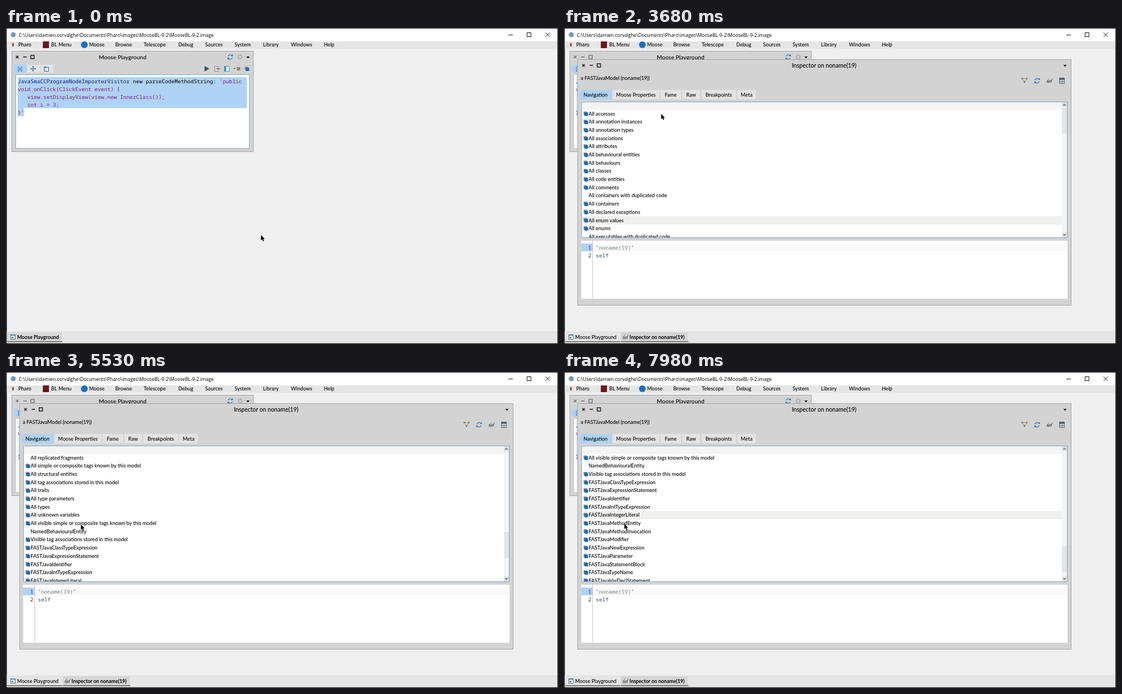
Recreate the animation shown at these times as an HTML page with a canvas. Size 990 by 566 pixels, loop 8 s.

```html
<!DOCTYPE html>
<html lang="en">
<head>
<meta charset="utf-8">
<title>Moose Playground</title>
<style>
html, body { margin: 0; width: 100%; height: 100%; overflow: hidden; background: #efefef; }
canvas { display: block; }
</style>
</head>
<body>
<canvas id="stage" width="990" height="566"></canvas>
<script>
const ctx = document.getElementById('stage').getContext('2d');
const UI = 'Lato, sans-serif', MONO = '"Noto Sans Mono", monospace', SANS = '"Open Sans", sans-serif';
const LOOP = 8000, ROW = 14.67, VISIBLE = 16;
const WINDOW = '#d2d3d2', ACCENT = '#afd2f7', BLUE = '#1769bd', SLATE = '#3c5360', BORDER = '#a5a6a5';

// A leading "-" marks an entry without an icon.
const ITEMS = [
  ...`accesses,annotation instances,annotation types,associations,attributes,behavioural entities,
  behaviours,classes,code entities,comments,-containers with duplicated code,containers,declared exceptions,
  enum values,enums,-executables with duplicated code,files,folders,functions,global variables,
  implicit variables,inheritances,invocations,local variables,methods,model annotation instances,
  model annotation types,model attributes,model classes,model containers,model enums,model functions,
  model methods,model namespaces,model packages,model structural entities,model types,models,namespaces,
  packages,parameter types,parameterizable classes,parameterized types,parameters,primitive types,references,
  -replicated fragments,simple or composite tags known by this model,structural entities,
  tag associations stored in this model,traits,type parameters,types,unknown variables,
  visible simple or composite tags known by this model`
    .split(',').map(s => s.trim()).map(s => s[0] === '-' ? '-All ' + s.slice(1) : 'All ' + s),
  '-NamedBehaviouralEntity', 'Visible tag associations stored in this model',
  ...`ClassTypeExpression,ExpressionStatement,Identifier,IntTypeExpression,IntegerLiteral,MethodEntity,
  MethodInvocation,Modifier,NewExpression,Parameter,StatementBlock,TypeName,VarDeclStatement,
  VariableDeclarator,VariableExpression,VariableName,WhileStatement`
    .split(',').map(s => 'FASTJava' + s.trim())
];

const MOUSE = [[0, 457, 371], [30, 457, 371], [450, 330, 252], [820, 238, 187], [1130, 194, 179], [1330, 194, 179],
  [1620, 174, 154], [3680, 174, 154], [4000, 166, 200], [4270, 160, 220], [4470, 158, 234], [4570, 158, 234],
  [4800, 153, 252], [5370, 140, 268], [6140, 112, 290], [6410, 112, 290], [6650, 116, 308], [6820, 116, 308],
  [7200, 138, 255], [7600, 146, 206], [7700, 142, 197], [7980, 108, 272], [8000, 108, 272]];
const SCROLL = [[0, 0], [3950, 0], [4270, 9], [4470, 17], [4570, 17], [4800, 34], [5370, 45], [5400, 45],
  [6080, 52], [6239, 52], [6240, 54], [8000, 54]];

function at(keys, t) {
  const i = Math.max(1, keys.findIndex(k => k[0] > t));
  const a = keys[i - 1], b = keys[i], p = (t - a[0]) / (b[0] - a[0]);
  return a.slice(1).map((v, n) => v + (b[n + 1] - v) * p);
}

function box(x, y, w, h, fill, stroke) {
  ctx.fillStyle = fill;
  ctx.fillRect(x, y, w, h);
  if (stroke) {
    ctx.strokeStyle = stroke;
    ctx.lineWidth = 1;
    ctx.strokeRect(x + .5, y + .5, w - 1, h - 1);
  }
}

function text(str, x, middle, { size = 9.15, color = '#000', font = UI, weight = 500, align = 'left' } = {}) {
  ctx.font = `${weight} ${size}px ${font}`;
  ctx.fillStyle = color;
  ctx.textAlign = align;
  ctx.fillText(str, x, middle + size * .36);
}

const code = (str, x, y, color) => text(str, x, y, { size: 9.57, font: MONO, weight: 400, color });

function line(points, color, width = 1) {
  ctx.beginPath();
  points.forEach(([x, y]) => ctx.lineTo(x, y));
  ctx.strokeStyle = color;
  ctx.lineWidth = width;
  ctx.stroke();
}

function polygon(points, color) {
  ctx.beginPath();
  points.forEach(([x, y]) => ctx.lineTo(x, y));
  ctx.fillStyle = color;
  ctx.fill();
}

function arc(x, y, r, color, { from = 0, to = 7, width = 0 } = {}) {
  ctx.beginPath();
  ctx.arc(x, y, r, from, to);
  ctx.fillStyle = ctx.strokeStyle = color;
  ctx.lineWidth = width;
  width ? ctx.stroke() : ctx.fill();
}

function cross(x, y, r, color, width) {
  line([[x - r, y - r], [x + r, y + r]], color, width);
  line([[x - r, y + r], [x + r, y - r]], color, width);
}

function windowButtons(x, y, color) {
  cross(x, y, 2.2, color, 1.5);
  box(x + 11, y - 1, 6, 1.5, color);
  ctx.strokeStyle = color;
  ctx.lineWidth = 1.4;
  ctx.strokeRect(x + 24.5, y - 3, 6, 6);
}

const dropdown = (x, y) => polygon([[x - 3, y - 1.5], [x + 3, y - 1.5], [x, y + 2]], '#111');

function refresh(x, y) {
  arc(x, y, 4, '#3c84c6', { from: .3, to: 2.7, width: 1.4 });
  arc(x, y, 4, '#3c84c6', { from: 3.4, to: 5.8, width: 1.4 });
  polygon([[x + 1, y - 2], [x + 5, y - 5.5], [x + 5, y - 1]], '#3c84c6');
  polygon([[x - 1, y + 2], [x - 5, y + 5.5], [x - 5, y + 1]], '#3c84c6');
}

function glasses(x, y) {
  arc(x - 3, y + 2, 1.7, '#56645f', { width: 1.2 });
  arc(x + 1.5, y + 1.5, 1.7, '#56645f', { width: 1.2 });
  line([[x - 4.5, y + 1], [x - 1, y - 3.5]], '#56645f');
  line([[x + 3, y + 1], [x + 5, y - 3.5]], '#56645f');
}

function grid(x, y, w, h, color) {
  box(x, y, w, h, '#f2f5f6', color);
  box(x, y, w, 3, color);
  for (let i = 1; i < 3; i++) {
    line([[x + w * i / 3, y], [x + w * i / 3, y + h]], color);
    line([[x, y + h * i / 3], [x + w, y + h * i / 3]], color);
  }
}

function desktop() {
  box(0, 0, 990, 566, '#16181d');
  box(1.5, 1, 987.5, 563.5, '#efefef');
  box(1.5, 1, 987.5, 23, '#fff');
  arc(13, 12, 4.5, '#7699b2');
  text('C:\\Users\\damien.corvalghe\\Documents\\Pharo\\images\\MooseBL-9-2\\MooseBL-9-2.image', 23, 12.5,
    { size: 8.49, font: SANS, weight: 400 });
  line([[901, 12.5], [909, 12.5]], '#111');
  box(934, 8, 8, 8, '#fff', '#111');
  cross(971.5, 12, 3.8, '#111', 1);

  box(1.5, 24, 987.5, 13, '#e5e5e5');
  box(11, 27, 3, 6, '#a84b3c');
  box(66, 24, 11, 12, '#701419');
  arc(140.5, 30, 6, '#176fc1');
  const menu = { Pharo: 22, 'BL Menu': 81, Moose: 149, Browse: 196, Telescope: 247, Debug: 309, Sources: 357,
    System: 410, Library: 461, Windows: 511, Help: 570 };
  for (const name in menu) text(name, menu[name], 30);
  box(1.5, 543, 987.5, 21.5, '#e5e5e5');
}

function taskbar(inspecting) {
  if (!inspecting) box(2, 545, 98, 16, '#d8d8d8');
  box(2, 561, 99, 1.5, '#5c5c5c');
  box(8, 549, 9, 9, '#eef4f8', '#4b7288');
  box(9, 549, 7, 2, '#3c84c6');
  box(10, 553, 3, 3, '#5b91b8');
  text('Moose Playground', 20, 553.5, { size: 9, weight: inspecting ? 500 : 700 });
  if (!inspecting) return;
  box(102, 545, 120, 16, '#d5d5d5');
  box(102, 561, 121, 1.5, '#5c5c5c');
  glasses(110.5, 553);
  text('Inspector on noname(19)', 117.6, 553.5, { size: 8.9, weight: 700 });
}

function playground({ active, selected, caret }) {
  box(10, 41, 434, 181, WINDOW, BORDER);
  windowButtons(20, 52, active ? '#111' : '#777');
  text('Moose Playground', 209, 52, { size: 10.4, align: 'center' });
  refresh(402, 52);
  arc(420, 52, 3.4, '#b2b4b2', { width: 2.4 });
  dropdown(434, 52.5);

  box(14, 66, 23, 14, ACCENT);
  box(38, 66, 23, 14, '#e3e4e3');
  box(62, 66, 23, 14, '#e3e4e3');
  text('[ı]', 25, 72.5, { size: 9, color: BLUE, weight: 700, align: 'center' });
  for (const [dx, dy] of [[1, 0], [-1, 0], [0, 1], [0, -1]]) {
    const x = 48.5 + dx * 5, y = 73 + dy * 5;
    line([[48.5, 73], [x - dx, y - dy]], BLUE);
    polygon([[x, y], [x - 2 * dx + 2 * dy, y - 2 * dy + 2 * dx], [x - 2 * dx - 2 * dy, y - 2 * dy - 2 * dx]], BLUE);
  }
  box(68, 70, 9, 8, '#eef4f8', BLUE);
  box(68, 69, 4, 2, BLUE);
  polygon([[356, 68], [364.5, 73], [356, 78]], SLATE);
  box(374, 68, 7, 10, '#e6e2e6', '#8c7f90');
  line([[377, 73], [384, 73]], '#8c5d86', 1.5);
  box(391, 68, 10, 10, '#e8f1f6', '#5b91b8');
  box(391, 68, 4, 10, '#5b91b8');
  box(408, 72, 4, 1, '#666');
  box(414, 70, 6, 6, '#858a8a');
  box(428, 69, 6, 6, '#999');
  box(430, 71, 6, 6, BLUE);

  box(17, 83, 420, 133, '#fff', active ? '#78acd8' : '#c3ccd2');
  if (selected) {
    const tint = active ? ACCENT : '#deecf9';
    box(21, 88, 411, 55.5, tint);
    box(21, 143, 11, 15, tint);
  }
  code('JavaSmaCCProgramNodeImporterVisitor', 21, 95.5, '#101a80');
  code('new parseCodeMethodString:', 227.7, 95.5, '#000');
  const string = '#7f1b8c';
  code("'public", 383, 95.5, string);
  ['void onClick(ClickEvent event) {', '   view.setDisplayView(view.new InnerClass());', '   int i = 3;', "}'"]
    .forEach((s, i) => code(s, 21, 109.5 + 14 * i, string));
  if (caret) box(32, 145, 1.6, 13, '#000');
}

function list(t) {
  box(31, 132, 872, 244, '#fff', '#78acd8');
  box(32, 133, 861, 14, '#f4f4f4');
  const top = Math.round(at(SCROLL, t)[0]);
  const hovered = t < 4570 ? 13 : t > 5900 ? 61 : -1;
  ctx.save();
  ctx.beginPath();
  ctx.rect(32, 133, 870, 242);
  ctx.clip();
  for (let i = 0; i < VISIBLE; i++) {
    const name = ITEMS[top + i], y = 153.5 + i * ROW;
    if (top + i === hovered) box(32, Math.round(y - 7.5), 861, 15, '#f0f0ef');
    if (name[0] !== '-') {
      box(35, y - 4, 6, 6, '#a0a4a5');
      box(36, y - 3, 6, 6, '#5b7f9c');
      box(37, y - 2, 6, 6, BLUE);
    }
    text(name.replace('-', ''), 44, y);
  }
  ctx.restore();
  box(893, 133, 9, 242, '#f4f4f4');
  box(893, 143 + top * 3.13, 9, 46, '#e5e5e5');
  for (const y of [133, 366]) box(893, y, 9, 9, '#e2e2e2');
  polygon([[894, 139], [901, 139], [897.5, 135]], '#8d8d8d');
  polygon([[894, 369], [901, 369], [897.5, 373]], '#8d8d8d');
}

function inspector(t) {
  box(24, 56, 886, 441, WINDOW, BORDER);
  windowButtons(35, 67, '#111');
  text('Inspector on noname(19)', 466.5, 67, { size: 10.5, align: 'center' });
  dropdown(898.5, 67.5);
  if (t < 3680) return;

  text('a FASTJavaModel (noname(19))', 30, 89.5, { size: 9 });
  line([[822, 90.5], [830, 90.5], [826, 97], [822, 90.5]], '#c79435', 1.2);
  for (const [x, y] of [[822, 90.5], [830, 90.5], [826, 97]]) arc(x, y, 1.5, '#4a86b4');
  refresh(848.5, 94.5);
  glasses(871, 94);
  grid(888, 89, 10, 11, '#4d6675');

  const tabs = [['Navigation', 28, 57], ['Moose Properties', 87, 84], ['Fame', 173, 37], ['Raw', 212, 32],
    ['Breakpoints', 246, 63], ['Meta', 311, 33]];
  tabs.forEach(([name, x, w], i) => {
    box(x, 111, w, 17, i ? '#e2e3e2' : ACCENT);
    text(name, x + w / 2, 119.5, { size: 9.05, align: 'center' });
  });
  list(t);

  box(31, 381, 872, 104, '#fff');
  box(52, 386, 850, 14, '#f8f8f8');
  box(31, 386, 20, 14, ACCENT);
  box(51, 381, 1, 104, '#c4c4c4');
  code('1', 43.3, 393.5, '#333');
  code('2', 43.3, 407.5, '#333');
  code('"noname(19)"', 57, 393.5, '#708473');
  code('self', 57, 407.5, '#2f5268');
}

function keystrokes(t) {
  if (t < 1780 || t >= 3380) return;
  const keys = t < 2550 ? 'Ctrl + A' : t < 2620 ? 'Ctrl + A  Ctrl + I' : 'Ctrl + I';
  ctx.font = `700 22px ${SANS}`;
  const w = Math.round(ctx.measureText(keys).width) + 6;
  box(495.5 - w / 2, 535, w, 31, '#000');
  text(keys, 495.5, 551, { size: 22, font: SANS, weight: 700, color: '#fff', align: 'center' });
}

function pointer(t) {
  const [x, y] = at(MOUSE, t).map(Math.round);
  if (t >= 1620 && t < 2720) {
    line([[x + .5, y - 4], [x + .5, y + 5]], '#333');
    for (const dy of [-4.5, 5.5]) line([[x - 2, y + dy], [x + 3, y + dy]], '#333');
    return;
  }
  polygon([[0, 0], [0, 9.5], [2.2, 7.6], [3.8, 11], [5.4, 10.2], [3.9, 7], [6.6, 6.7]]
    .map(([dx, dy]) => [x + .3 + dx, y + dy]), '#000');
}

function draw(now) {
  const t = now % LOOP, opened = t >= 2720;
  desktop();
  taskbar(t >= 3680);
  playground({
    active: !opened,
    selected: t < 1590 || t >= 1780,
    caret: !opened && (t >= 1590 || (t > 400 && t < 900))
  });
  if (opened) inspector(t);
  keystrokes(t);
  pointer(t);
  requestAnimationFrame(draw);
}
requestAnimationFrame(draw);
</script>
</body>
</html>
```
